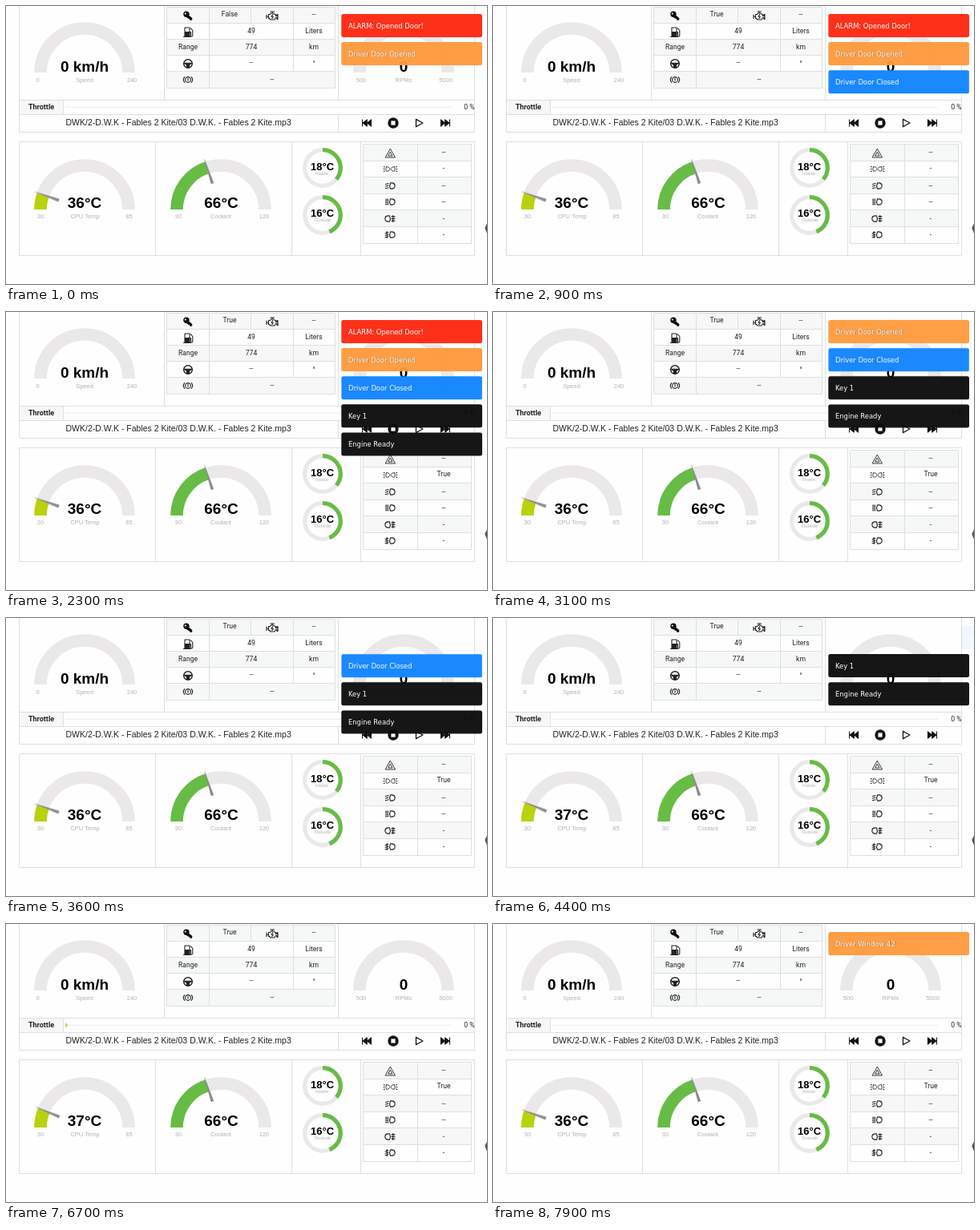
Recreate the animation shown at these times as an HTML page. Size 600 px wide and 347 px high, loop 8000 ms.

```html
<!DOCTYPE html>
<html lang="en">
<head>
<meta charset="utf-8">
<title>Car dashboard</title>
<style>
html, body { margin: 0; width: 100%; height: 100%; overflow: hidden; background: #fefefe; }
svg { display: block; width: 600px; height: 347px; overflow: hidden; }
text { font-family: "Liberation Sans", Arial, sans-serif; text-anchor: middle; }
.start { text-anchor: start; }
.cell text { font: 8.6px Roboto, sans-serif; fill: #222; }
.cell .head { font-weight: 700; font-size: 9px; }
.value { font-size: 19px; font-weight: 700; }
.small { font-size: 13px; font-weight: 700; }
.label { font-size: 7.5px; fill: #b3b3b3; }
.tiny { font-size: 6px; fill: #b3b3b3; }
.song { font-size: 10.5px; fill: #222; }
.grid { fill: none; stroke: #dedfe0; }
.stripe { fill: #f6f7f7; }
.line { fill: none; stroke: #222; stroke-width: 1.1; stroke-linecap: round; stroke-linejoin: round; }
.track { fill: none; stroke: #eae8e9; }
.arc { fill: none; stroke: #67bc45; }
.needle { fill: #8d8d91; }

/* Timeline */
.a { animation: 8s infinite; }
.step { animation-timing-function: step-end; }
.ease { animation-timing-function: ease-out; }
.cpu-arc { stroke: #b9d20b; stroke-dasharray: 19.64 400; animation-name: cpu-arc; }
.cpu-needle { transform: rotate(19.64deg); animation-name: cpu-needle; }
.warm { visibility: hidden; animation-name: warm; }
.cool { animation-name: cool; }
.key-off { animation-name: key-off; }
.key-on { animation-name: key-on; }
.lamp-off { animation-name: lamp-off; }
.lamp-on { animation-name: lamp-on; }
.pedal { animation-name: pedal; visibility: hidden; }
@keyframes cpu-arc {
  0%, 49.375%, 96.25%, 100% { stroke-dasharray: 19.64 400; }
  58.125%, 87.5% { stroke-dasharray: 22.91 400; }
}
@keyframes cpu-needle {
  0%, 49.375%, 96.25%, 100% { transform: rotate(19.64deg); }
  58.125%, 87.5% { transform: rotate(22.91deg); }
}
@keyframes warm { 0%, 87.5%, 100% { visibility: hidden; } 49.375% { visibility: visible; } }
@keyframes cool { 0%, 87.5%, 100% { visibility: visible; } 49.375% { visibility: hidden; } }
@keyframes key-off { 0% { visibility: visible; } 11.25%, 100% { visibility: hidden; } }
@keyframes key-on { 0% { visibility: hidden; } 11.25%, 100% { visibility: visible; } }
@keyframes lamp-off { 0% { visibility: visible; } 21.25%, 100% { visibility: hidden; } }
@keyframes lamp-on { 0% { visibility: hidden; } 21.25%, 100% { visibility: visible; } }
@keyframes pedal { 0%, 87.5%, 100% { visibility: hidden; } 78.75% { visibility: visible; } }

/* Toasts: the stack moves up one slot whenever the top one is gone */
.stack { animation-name: stack; }
@keyframes stack {
  0% { transform: none; }
  38.125% { transform: translateY(-35.1px); }
  45.125% { transform: translateY(-70.2px); }
  56.875% { transform: translateY(-105.3px); }
  66.4375% { transform: translateY(-140.4px); }
  74.625%, 100% { transform: translateY(-175.5px); }
}
.toast { --out: cubic-bezier(.6, -.28, .735, .045); animation-timing-function: cubic-bezier(.175, .885, .32, 1.275); }
.toast text { font: 8.4px "DejaVu Sans", sans-serif; fill: #fff; text-anchor: start; }
.soft text { text-shadow: .6px .6px 1px #8b5a2b; }
.alarm { animation-name: alarm; }
.opened { animation-name: opened; }
.closed { animation-name: closed; }
.key { animation-name: key; }
.engine { animation-name: engine; }
.window { animation-name: window; }
@keyframes alarm {
  0%, 32.5% { transform: none; opacity: .98; animation-timing-function: var(--out); }
  38.125%, 100% { transform: translateX(176px); opacity: 0; }
}
@keyframes opened {
  0%, 38.875% { transform: none; opacity: .95; animation-timing-function: var(--out); }
  45.125%, 100% { transform: translateX(176px); opacity: 0; }
}
@keyframes closed {
  0%, 56.875%, 100% { transform: translateX(176px); opacity: 0; }
  6.25% { transform: none; opacity: .98; }
  50.625% { transform: none; opacity: .98; animation-timing-function: var(--out); }
}
@keyframes key {
  0%, 11.25%, 66.4375%, 100% { transform: translateX(176px); opacity: 0; }
  17.5% { transform: none; opacity: .96; }
  60.1875% { transform: none; opacity: .96; animation-timing-function: var(--out); }
}
@keyframes engine {
  0%, 18.75%, 74.625%, 100% { transform: translateX(176px); opacity: 0; }
  25% { transform: none; opacity: .96; }
  68.375% { transform: none; opacity: .96; animation-timing-function: var(--out); }
}
@keyframes window {
  0%, 87.5% { transform: translateX(176px); opacity: 0; }
  93.75%, 100% { transform: none; opacity: .95; }
}
</style>
</head>
<body>
<svg viewBox="0 0 600 347" width="600" height="347">
<defs>
  <path id="half" d="M-55 0A55 55 0 0 1 55 0" pathLength="180" stroke-width="15.6"/>
  <path id="needle" d="M-66 -.3L-34 -1.9V1.9L-66 .3Z"/>
  <circle id="ring" r="22.3" stroke-width="5.2" pathLength="360" transform="rotate(-90)"/>
  <path id="skip" d="M-5.5 -4.5V4.5M-5 0L.3 -4.3V4.3ZM.3 0L5.6 -4.3V4.3Z" fill="#111" stroke="#111" stroke-width="1"/>
  <path id="lens" d="M0 -3.6H1.6C7 -3.6 7 3.6 1.6 3.6H0C-1 1.5 -1 -1.5 0 -3.6Z"/>
  <rect id="box" x="418.3" width="175.7" height="29" rx="2.5"/>
</defs>

<!-- panels -->
<path class="stripe" d="M16 118H71V135H16Z"/>
<path class="grid" d="M16.5 0V157.5H584.5V0M16 117.5H584M16 135.5H584M197.5 0V117M414.5 0V117M414.5 136V157M71.5 118V135M16.5 169.5H584.5V311.5H16.5ZM186.5 170V311M356.5 170V311M442.5 170V311"/>

<!-- status table -->
<path class="stripe" d="M201 2H410V21H201ZM201 42H410V61H201ZM201 82H410V102H201Z"/>
<path class="grid" d="M200.5 1.5H410.5V102.5H200.5ZM200 21.5H410M200 41.5H410M200 61.5H410M200 81.5H410M253.5 2V102M305.5 2V21M358.5 2V81"/>
<g class="cell">
  <text class="a step key-off" x="279" y="13.2">False</text>
  <text class="a step key-on" x="279" y="13.2">True</text>
  <text x="384" y="13">--</text>
  <text x="306" y="34">49</text><text x="384" y="34">Liters</text>
  <text x="227" y="54">Range</text><text x="306" y="54">774</text><text x="384" y="54">km</text>
  <text x="306" y="73">--</text><text x="384" y="75">°</text>
  <text x="332" y="94">--</text>
  <text class="head start" x="28" y="129.2">Throttle</text>
  <text x="578" y="129.2">0 %</text>
</g>

<!-- status icons -->
<g transform="translate(227 12)">
  <path d="M-.5 -1L4.8 3V5.2H2.5V3.6H1L-2 1.5Z" stroke="#111"/>
  <circle cx="-2" cy="-1.7" r="3.7" fill="#111"/><circle cx="-3.2" cy="-2.6" r="1" fill="#fff"/>
</g>
<g class="line" transform="translate(227 32.5)">
  <path d="M-4 6V-5.5H2V6ZM-5.5 6H3.5M2 0H3.5V4C3.5 6 5.8 6 5.8 4V-2L3.5 -4.6"/>
  <path d="M-3.5 0H1.5V5.5H-3.5Z" fill="#222"/>
</g>
<g class="line" transform="translate(227 72)">
  <circle r="5.3" stroke-width="1.5"/>
  <path d="M-4.6 -.8H4.6L1.5 1.5V4.7H-1.5V1.5Z" fill="#222"/>
</g>
<g class="line" transform="translate(227 92)" stroke-width="1">
  <circle r="3.4"/><path d="M0 -1.7V.5M0 1.7V1.8M-4.2 -3.3C-6 -1.4 -6 1.4 -4.2 3.3M4.2 -3.3C6 -1.4 6 1.4 4.2 3.3"/>
</g>
<g class="line" transform="translate(332 12.5)">
  <path d="M-4.5 -2H-2.5L-1.5 -3.5H2L3.3 -2H4.5V0H6V-2H7V4H6V2H4.5L3 4.5H-2L-3.5 3H-4.5ZM-7 -1.5V3M-7 .8H-4.5M-2 -5.5H2.5M.2 -5.5V-3.5M.8 -2L-1 .8H1.4L-.2 3"/>
</g>

<!-- upper gauges -->
<g class="track">
  <use href="#half" x="98" y="83"/><use href="#half" x="496" y="83"/>
  <use href="#half" x="98" y="254"/><use href="#half" x="268" y="254"/>
  <use href="#ring" transform="translate(395 202)"/><use href="#ring" transform="translate(395 261)"/>
</g>
<text class="value" x="98" y="81.6">0 km/h</text>
<text class="value" x="496" y="81.6">0</text>
<g class="label">
  <text x="39.5" y="94.5">0</text><text x="98" y="94.5">Speed</text><text x="157" y="94.5">240</text>
  <text x="443" y="94.5">500</text><text x="496" y="94.5">RPMs</text><text x="548.5" y="94.5">5000</text>
  <text x="43" y="264.8">30</text><text x="98.5" y="264.8">CPU Temp</text><text x="153.5" y="264.8">85</text>
  <text x="215" y="264.8">30</text><text x="268" y="264.8">Coolant</text><text x="322" y="264.8">120</text>
</g>

<!-- throttle and player -->
<path d="M74 126.3H555" stroke="#ececef"/>
<path class="a step pedal" d="M74 123.8H75.5L77.3 126.3L75.5 129H74Z" fill="#e3cf52"/>
<text class="song start" x="74.5" y="149.2">DWK/2-D.W.K - Fables 2 Kite/03 D.W.K. - Fables 2 Kite.mp3</text>
<use href="#skip" x="450" y="146"/>
<circle cx="483" cy="146" r="6.7" fill="#111"/><path d="M480.4 143.4H485.6V148.6H480.4Z" fill="#fff"/>
<path d="M511.5 141.3L520 146L511.5 150.7Z" class="line" style="stroke-width:1.4"/>
<use href="#skip" transform="translate(548 146) scale(-1 1)"/>

<!-- temperatures -->
<g transform="translate(98 254)">
  <use href="#half" class="arc a ease cpu-arc"/>
  <g class="a ease cpu-needle"><use href="#needle" class="needle"/></g>
</g>
<g transform="translate(268 254)">
  <use href="#half" class="arc" stroke-dasharray="72 400"/>
  <use href="#needle" class="needle" transform="rotate(72)"/>
</g>
<text class="value a step cool" x="98" y="251.8">36°C</text>
<text class="value a step warm" x="98" y="251.8">37°C</text>
<text class="value" x="268.5" y="251.8">66°C</text>
<g class="arc">
  <use href="#ring" transform="translate(395 202)" stroke-dasharray="130 400"/>
  <use href="#ring" transform="translate(395 261)" stroke-dasharray="158 400"/>
</g>
<text class="tiny" x="394" y="210.5">Inside</text><text class="tiny" x="395" y="269">Outside</text>
<text class="small" x="394.5" y="205.2">18°C</text><text class="small" x="394.5" y="263.4">16°C</text>

<!-- lights table -->
<path class="stripe" d="M446 173H580V193H446ZM446 214H580V234H446ZM446 255H580V275H446Z"/>
<path class="grid" d="M445.5 172.5H580.5V296.5H445.5ZM445 193.5H580M445 213.5H580M445 234.5H580M445 254.5H580M445 275.5H580M513.5 173V296"/>
<g class="cell">
  <text x="546" y="185">--</text>
  <text class="a step lamp-off" x="546" y="205.3">-</text>
  <text class="a step lamp-on" x="546" y="205.3">True</text>
  <text x="546" y="227">--</text><text x="546" y="247">--</text>
  <text x="546" y="268">-</text><text x="546" y="288">-</text>
</g>
<g class="line">
  <path d="M479.5 178.5L485.5 189H473.5ZM479.5 182.5L482 187H477Z" stroke-width=".9"/>
  <g transform="translate(479.5 203.5)">
    <use href="#lens" transform="translate(-5 0) scale(.75)"/><use href="#lens" transform="translate(5 0) scale(-.75 .75)"/>
    <path d="M-7.2 -2.5L-8.2 -3M-7.4 0H-8.4M-7.2 2.5L-8.2 3M7.2 -2.5L8.2 -3M7.4 0H8.4M7.2 2.5L8.2 3"/>
  </g>
  <g transform="translate(479.5 224.5)"><use href="#lens"/><path d="M-2.5 -3L-6 -2M-2.5 -.5L-6 .5M-2.5 2.3L-6 3.3"/></g>
  <g transform="translate(479.5 244.5)"><use href="#lens"/><path d="M-2.5 -3.3H-6M-2.5 -1.1H-6M-2.5 1.1H-6M-2.5 3.3H-6"/></g>
  <g transform="translate(478.5 265.5) scale(-1 1)"><use href="#lens"/><path d="M-2.5 -2.6H-6.5M-2.5 0H-6.5M-2.5 2.6H-6.5M-4.3 -4C-5.3 -1.5 -3.3 1.5 -4.3 4"/></g>
  <g transform="translate(479.5 285.5)"><use href="#lens"/><path d="M-2.5 -2.8L-6.5 -1.8M-2.5 -.3L-6.5 .7M-2.5 2.2L-6.5 3.2M-4.3 -4C-5.3 -1.5 -3.3 1.5 -4.3 4"/></g>
</g>

<path d="M597.3 277L600 271.5V284Z" fill="#555"/>

<g class="a step stack">
  <g class="a toast alarm"><use href="#box" y="10" fill="#ff2c14"/><text x="427" y="27.7">ALARM: Opened Door!</text></g>
  <g class="a toast soft opened"><use href="#box" y="45.1" fill="#ff993b"/><text x="427" y="62.8">Driver Door Opened</text></g>
  <g class="a toast closed"><use href="#box" y="80.2" fill="#1586ff"/><text x="427" y="97.9">Driver Door Closed</text></g>
  <g class="a toast key"><use href="#box" y="115.3" fill="#0c0c0c"/><text x="427" y="133">Key 1</text></g>
  <g class="a toast engine"><use href="#box" y="150.4" fill="#0c0c0c"/><text x="427" y="168.1">Engine Ready</text></g>
  <g class="a toast soft window"><use href="#box" y="185.5" fill="#ff993b"/><text x="427" y="203.2">Driver Window 42</text></g>
</g>
</svg>
</body>
</html>
```
